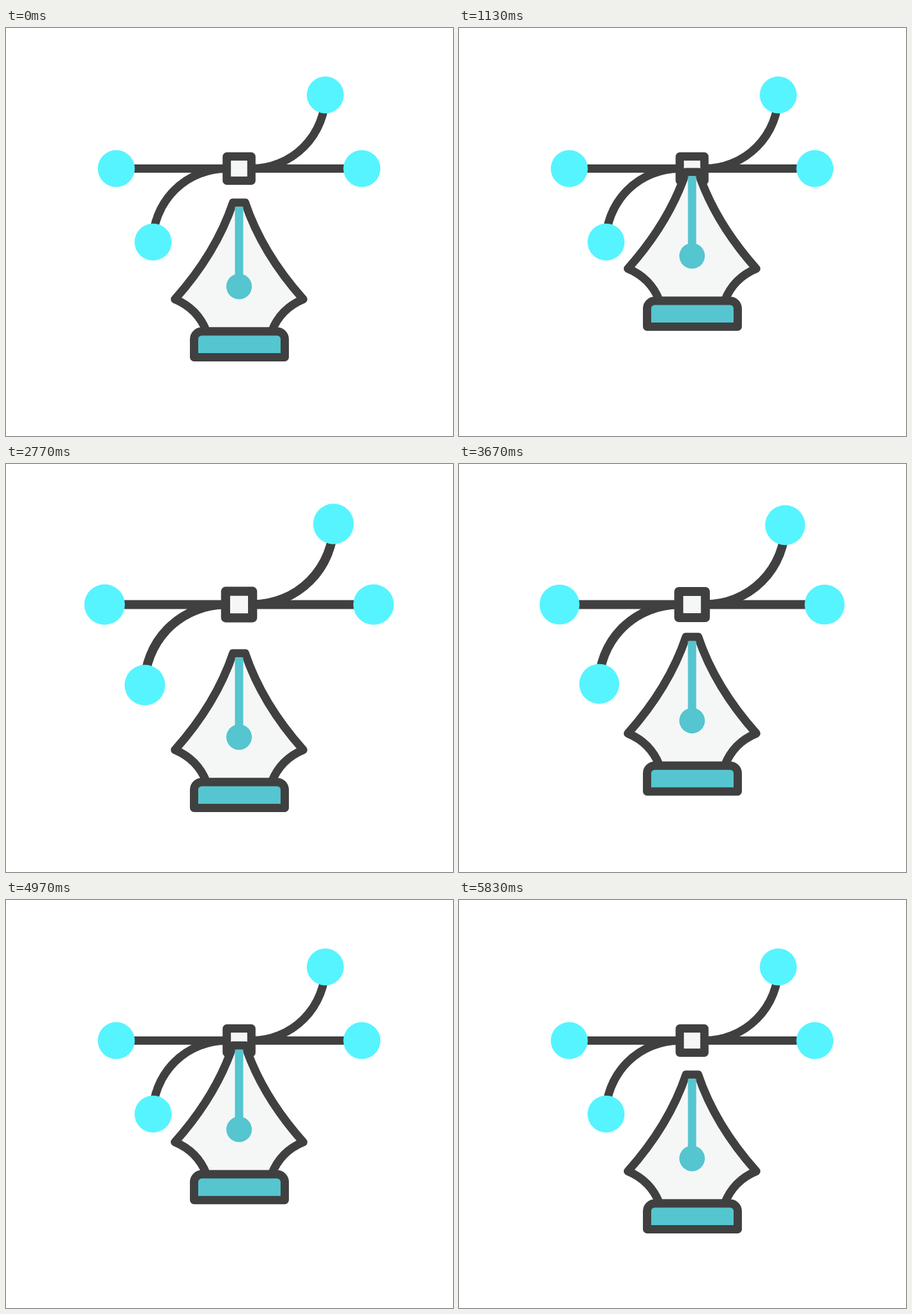
Animation of 700 by 640 pixels, one loop 5.96 s. Source, as an HTML page:

```html
<!DOCTYPE html>
<html lang="en">
<head>
<meta charset="utf-8">
<title>Pen tool</title>
<style>
  html, body { margin: 0; width: 100%; height: 100%; overflow: hidden; background: #fff; }
  svg { display: block; width: 700px; height: 640px; }
  .line { fill: none; stroke: #404040; stroke-width: 13; stroke-linejoin: round; }
  .pale { fill: #f5f7f7; }
  .teal { fill: #55c5d0; }
  .knob { fill: #56f4ff; }
</style>
</head>
<body>
<svg viewBox="0 0 700 640">
  <!-- handles, centred on the anchor point -->
  <g id="handles">
    <path class="line" d="M-192 0H192M135 -115.5A115.5 115.5 0 0 1 20 0M-135 115.5A115.5 115.5 0 0 1 -20 0"/>
    <rect class="line pale" x="-19.3" y="-19" width="38.6" height="38" style="fill:#f5f7f7"/>
    <g class="knob">
      <circle cx="-192.3" r="29"/>
      <circle cx="192.3" r="29"/>
      <circle cx="135" cy="-115.5" r="29"/>
      <circle cx="-134.7" cy="115.3" r="29"/>
    </g>
  </g>
  <g id="pen">
    <path class="line" style="fill:#f5f7f7" d="M355.5 274H374.5Q401 353 465.5 425.5Q430 440 416 476H314Q300 440 264.5 425.5Q329 353 355.5 274Z"/>
    <path class="teal" d="M358.5 280.5h13V405h-13Z"/>
    <circle class="teal" cx="365" cy="405.5" r="20"/>
    <path class="line" style="fill:#55c5d0" d="M294.5 516.5V488a12 12 0 0 1 12 -12H424.500a12 12 0 0 1 12 12V516.5Z"/>
  </g>
</svg>
<script>
  const LOOP = 5960, LOW = 26, HIGH = -51, GROWTH = 0.097;
  const pen = document.getElementById('pen');
  const handles = document.getElementById('handles');

  const sine = x => (1 - Math.cos(Math.PI * x)) / 2;

  // Cubic Bezier easing (.25, .1, .62, 1), solved by bisection
  function glide(x) {
    const bez = (u, a, b) => 3 * (1 - u) ** 2 * u * a + 3 * (1 - u) * u * u * b + u ** 3;
    let lo = 0, hi = 1;
    for (let i = 0; i < 24; i++) {
      const mid = (lo + hi) / 2;
      if (bez(mid, .25, .62) < x) lo = mid; else hi = mid;
    }
    return bez(lo, .1, 1);
  }

  const phase = (t, start, end, ease) =>
    ease(Math.min(1, Math.max(0, (t - start) / (end - start))));

  function draw(now) {
    const t = now % LOOP;
    const y = HIGH * phase(t, 0, 1340, sine)
      + (LOW - HIGH) * phase(t, 1400, 3000, glide)
      + (HIGH - LOW) * phase(t, 3133, 4733, glide)
      - HIGH * phase(t, 4840, 5850, glide);
    const scale = 1 + GROWTH * (phase(t, 1400, 2900, sine) - phase(t, 3250, 4750, sine));
    pen.setAttribute('transform', `translate(0 ${y})`);
    handles.setAttribute('transform', `translate(365 220.5) scale(${scale})`);
  }

  const start = performance.now();
  function tick() {
    draw(performance.now() - start);
    requestAnimationFrame(tick);
  }
  tick();
</script>
</body>
</html>
```
